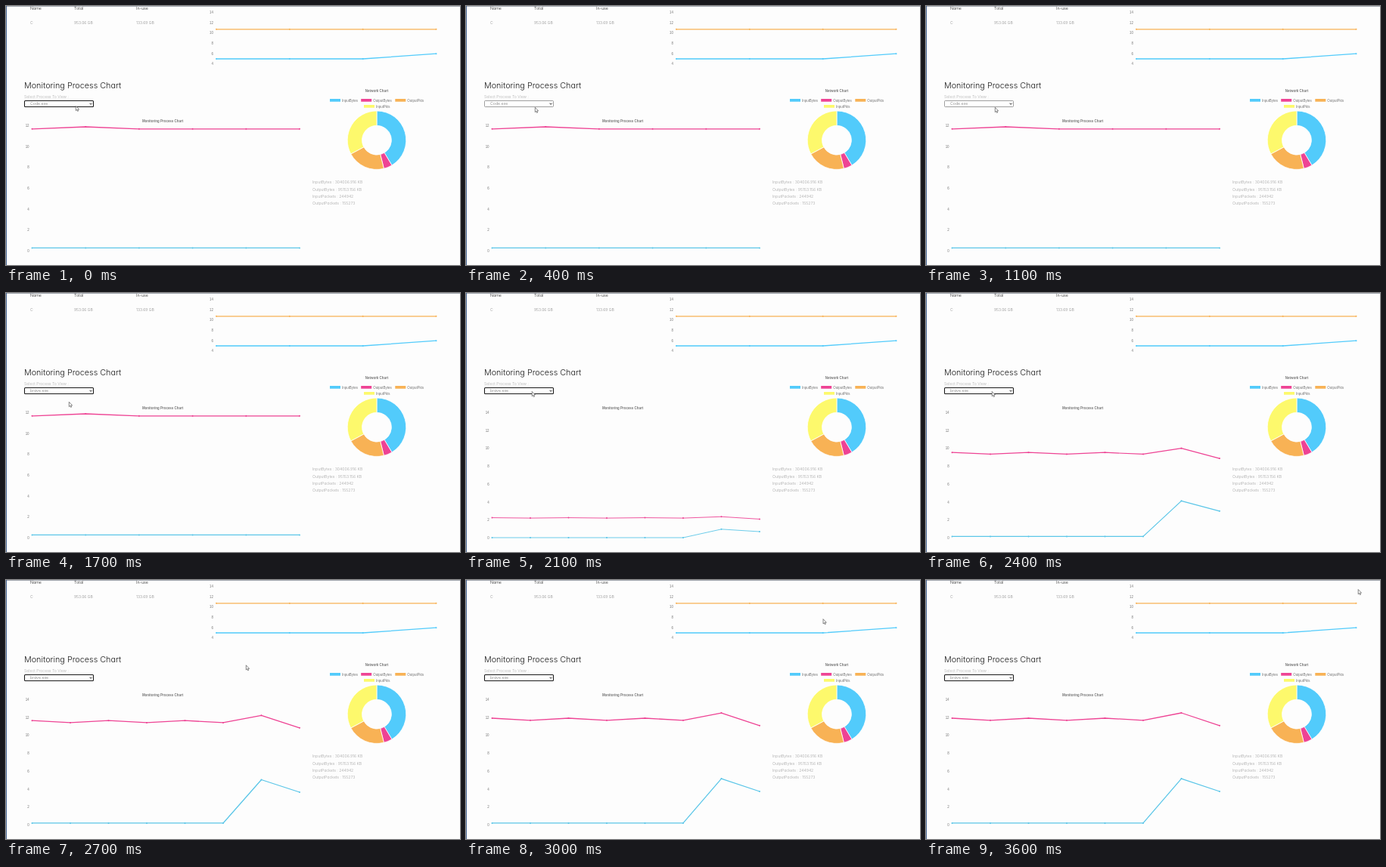
An HTML page that plays this animation: 600x343 px, repeating every 3700 ms.

```html
<!DOCTYPE html>
<html lang="en">
<head>
<meta charset="utf-8">
<title>Process monitor</title>
<style>
html, body { margin: 0; width: 100%; height: 100%; overflow: hidden; background: #fdfdfd; }
svg { display: block; width: 600px; height: 343px; }
.ui { font-family: Inter, "Open Sans", sans-serif; font-weight: 300; font-feature-settings: "cv11"; }
.chart { font: 4.45px "Liberation Sans", Arial, sans-serif; fill: #777; }
.title { font-weight: bold; text-anchor: middle; }
.axis { text-anchor: end; }
</style>
</head>
<body>
<svg id="stage" viewBox="0 0 600 343" xmlns="http://www.w3.org/2000/svg"></svg>
<script>
const LOOP = 3700, STEP = 100;
const BLUE = '#52cbfb', PINK = '#ee4394', ORANGE = '#f8b255', YELLOW = '#fdf96c', AQUA = '#5bc6e8';
const BASE = 324.5;
const stage = document.getElementById('stage');

function add(tag, attrs, parent = stage) {
  const el = document.createElementNS('http://www.w3.org/2000/svg', tag);
  for (const key in attrs) el.setAttribute(key, attrs[key]);
  parent.appendChild(el);
  return el;
}

function label(text, x, y, cls, attrs = {}, parent = stage) {
  const el = add('text', { x, y, class: cls, ...attrs }, parent);
  el.textContent = text;
  return el;
}

const ui = (text, x, y, size, fill) => label(text, x, y, 'ui', { 'font-size': size, fill });

function axis(max, min, x, top, bottom, parent = stage) {
  for (let v = max; v >= min; v -= 2) {
    const y = top + (bottom - top) * (max - v) / (max - min);
    label(v, x, y + 1.7, 'chart axis', {}, parent);
  }
}

// Returns a function that draws the line with its heights scaled by grow
function makeLine(color, x0, x1, base, heights, parent = stage) {
  const path = add('path', { fill: 'none', stroke: color, 'stroke-linejoin': 'round' }, parent);
  const gap = (x1 - x0) / (heights.length - 1);
  const dots = heights.map((h, i) => add('circle', { r: 1, cx: x0 + gap * i, fill: color }, parent));
  return (grow = 1) => {
    const ys = heights.map(h => base - h * grow);
    path.setAttribute('d', 'M' + ys.map((y, i) => `${x0 + gap * i} ${y}`).join('L'));
    path.setAttribute('stroke-width', 0.8 + 0.5 * grow);
    dots.forEach((dot, i) => dot.setAttribute('cy', ys[i]));
  };
}

function slice(from, to, fill) {
  const at = (deg, r) => {
    const a = deg * Math.PI / 180;
    return `${490 + r * Math.sin(a)} ${177.7 - r * Math.cos(a)}`;
  };
  const R = 38.8, r = 19.4;
  add('path', {
    d: `M${at(from, R)}A${R} ${R} 0 0 1 ${at(to, R)}L${at(to, r)}A${r} ${r} 0 0 0 ${at(from, r)}Z`,
    fill, stroke: '#fff', 'stroke-width': 0.8
  });
}

// Page frame and drive table
add('rect', { width: 600, height: 343, fill: '#fdfdfd' });
add('rect', { width: 600, height: 0.8, fill: '#8b929c' });
add('rect', { width: 0.9, height: 343, fill: '#35588c' });
[['Name', 'C', 32], ['Total', '953.06 GB', 90], ['In-use', '133.69 GB', 172]].forEach(([head, value, x]) => {
  ui(head, x, 5, 5.3, '#222');
  ui(value, x, 24.2, 5.05, '#8a8a8a');
});

// Upper chart
axis(14, 4, 274, 8.6, 76.5);
makeLine(ORANGE, 278, 568.5, 30.8, [0, 0, 0, 0])();
makeLine(BLUE, 278, 568.5, 70, [0, 0, 0, 6.8])();

// Process selector
ui('Monitoring Process Chart', 24, 108.8, 10.8, '#1c1c1c');
ui('Select Process To View :', 24, 122.4, 5.15, '#aaa');
const box = add('rect', { x: 24.5, y: 125.5, width: 91, height: 8, rx: 1, fill: '#fff' });
const choice = ui('', 32, 131.3, 5.25, '#777');
add('path', { d: 'M110.5 128.7l1.6 1.6l1.6-1.6', fill: 'none', stroke: '#222', 'stroke-width': 1 });

// Network chart
label('Network Chart', 490, 114.2, 'chart title');
[['InputBytes', 428, 123, BLUE], ['OutputBytes', 469.2, 123, PINK],
 ['OutputPkts', 514.3, 123, ORANGE], ['InputPkts', 473, 131, YELLOW]].forEach(([name, x, y, fill]) => {
  add('rect', { x, y, width: 14, height: 3.7, fill });
  label(name, x + 16, y + 3.5, 'chart');
});
slice(0, 149, BLUE);
slice(149, 166, PINK);
slice(166, 242, ORANGE);
slice(242, 360, YELLOW);
['InputBytes :  304006.916 KB', 'OutputBytes : 95153.156 KB', 'InputPackets : 244942', 'OutputPackets : 155273']
  .forEach((text, i) => ui(text, 405, 235.3 + i * 9.25, 5.15, '#a2a2a2'));

// Process chart: a nearly flat process, then one that ends in a spike
label('Monitoring Process Chart', 207, 153.9, 'chart title');
function makeChart(max, count, low, high) {
  const group = add('g', {});
  axis(max, 0, 30.6, 158.3, 324.4, group);
  const lines = [[AQUA, low], [PINK, high]].map(([color, height]) =>
    makeLine(color, 34.5, 388, BASE, Array.from({ length: count }, (_, i) => height(i)), group));
  return { group, draw: grow => lines.forEach(line => line(grow)) };
}
const oldChart = makeChart(12, 6, () => 4.1, i => i === 1 ? 164.5 : 161.7);
const newChart = makeChart(14, 8,
  i => i < 6 ? 2.6 : 61.4 - 16.9 * (i - 6),
  i => 140.1 + (-1) ** i * (i < 6 ? 1.4 : 8.4));
oldChart.draw(1);

const pointer = add('path', {
  d: 'M0 0V6.2L1.4 5L2.3 7.1L3.3 6.7L2.4 4.6H4.3Z',
  fill: '#fff', stroke: '#555', 'stroke-width': 0.7, 'stroke-linejoin': 'round'
});

const phase = (t, from, to) => Math.min(1, Math.max(0, (t - from) / (to - from)));
const easeOut = (k, power) => 1 - (1 - k) ** power;

// Pointer moves: start, end, target x, target y
const moves = [
  [0, 300, 91.3, 134.3], [1300, 1500, 83.3, 144.3], [1700, 2000, 87.2, 130.4],
  [2500, 2700, 317.3, 112.8], [2700, 3500, 571.2, 12.5]
];

function pointerAt(t) {
  return moves.reduce(([x, y], [from, to, tx, ty]) => {
    const k = easeOut(phase(t, from, to), 2);
    return [x + (tx - x) * k, y + (ty - y) * k];
  }, [92.3, 132.3]);
}

const show = (el, on) => el.setAttribute('visibility', on ? 'visible' : 'hidden');

function render(ms) {
  const t = Math.floor((ms % LOOP) / STEP) * STEP;
  const fresh = t >= 2100, focused = t < 200 || t >= 1400;
  show(oldChart.group, !fresh);
  show(newChart.group, fresh);
  newChart.draw(easeOut(phase(t, 2045, 3115), 4));
  choice.textContent = t < 1400 ? 'Code.exe' : 'brave.exe';
  box.setAttribute('stroke', focused ? '#1a1a1a' : '#777');
  box.setAttribute('stroke-width', focused ? 1.1 : 0.7);
  pointer.setAttribute('transform', `translate(${pointerAt(t).join(' ')})`);
}

const start = performance.now();
function tick() {
  render(performance.now() - start);
  requestAnimationFrame(tick);
}
tick();
</script>
</body>
</html>
```
